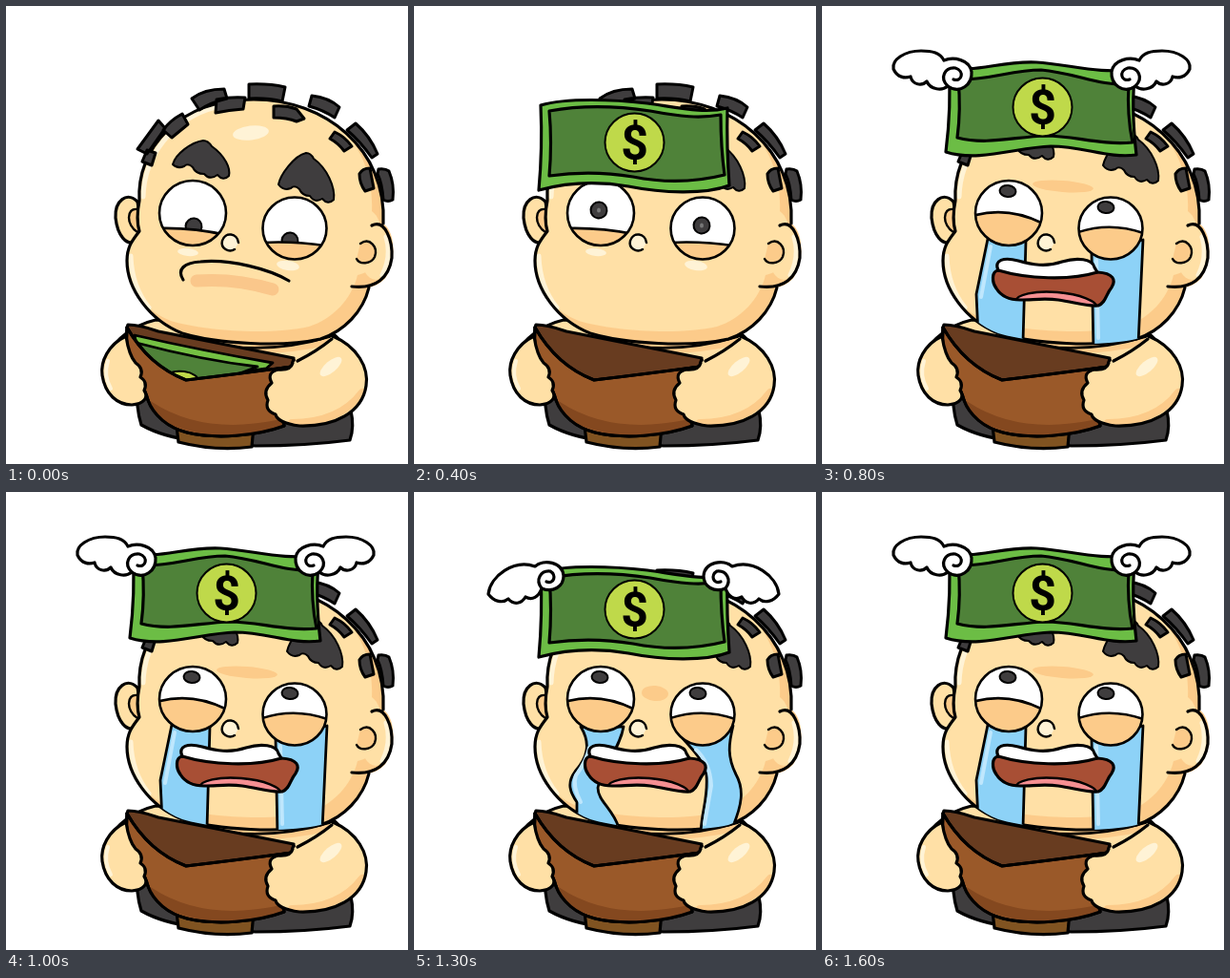
Write an HTML page with a canvas that moves like this. It is 422 px wide and 480 px high and loops after 1.7 s.

```html
<!DOCTYPE html>
<html>
<head>
<meta charset="utf-8">
<style>
html, body { margin: 0; width: 100%; height: 100%; overflow: hidden; background: #fff; }
canvas { display: block; }
</style>
</head>
<body>
<canvas id="stage" width="422" height="480"></canvas>
<script>
const ctx = document.getElementById('stage').getContext('2d');
const SKIN = '#ffe0a6', SHADE = '#fccb8a', LIGHT = '#fff3d6', HAIR = '#3f3d3e';
const LIME = '#6cbd45', GREEN = '#4f8239', COIN = '#bfd94a';
ctx.lineJoin = ctx.lineCap = 'round';

function shape(d, fill, width = 3.2) {
  const path = new Path2D(d);
  if (fill) { ctx.fillStyle = fill; ctx.fill(path); }
  if (width) { ctx.lineWidth = width; ctx.strokeStyle = '#000'; ctx.stroke(path); }
}
function oval(x, y, rx, ry, turn, fill, width = 0) {
  ctx.beginPath();
  ctx.ellipse(x, y, rx, ry, turn, 0, 7);
  ctx.fillStyle = fill;
  ctx.fill();
  if (width) { ctx.lineWidth = width; ctx.strokeStyle = '#000'; ctx.stroke(); }
}
function glow(d, color, width) {
  ctx.lineWidth = width;
  ctx.strokeStyle = color;
  ctx.stroke(new Path2D(d));
}
function moved(x, y, draw) {
  ctx.save();
  ctx.translate(x, y);
  draw();
  ctx.restore();
}
function clipped(d, draw) {
  ctx.save();
  ctx.clip(new Path2D(d));
  draw();
  ctx.restore();
}

const HEAD = 'M140 204C137 150 180 98 260 98C335 98 400 150 396 228C410 238 409 268 399 284C394 291 386 294 381 295C375 320 355 341 330 349C290 358 222 354 185 343C150 329 127 296 127 267C127 252 133 245 140 236C137 226 138 214 140 204Z';
const TUFTS = 'M160 120L167 128 148 155 138 150ZM195 97Q208 87 229 87L232 97Q215 101 203 109ZM255 82Q276 81 293 85L290 100Q274 96 255 97ZM321 94Q339 96 350 106L345 117Q333 109 318 105ZM367 123Q382 136 390 155L384 159Q372 142 358 130ZM391 171Q398 170 402 173Q408 187 406 203Q401 206 396 203Q395 186 390 176Z';
const INNER_TUFTS = 'M148 151L157 154 153 167 143 163ZM165 130Q172 120 185 113L191 124 174 138ZM221 98Q235 95 251 96L249 108Q234 109 220 112ZM281 105Q294 104 305 108L313 118 305 121Q295 117 281 117ZM345 132Q356 137 363 147L355 152Q349 144 340 139ZM371 176Q374 170 382 170L386 191 377 194Q371 186 371 176Z';
const BROW_L = 'M175 166C178 155 194 143 207 141Q212 141 216 147C230 157 236 170 234 178Q228 184 222 177Q214 183 208 176Q199 176 196 169Q191 164 187 168Q180 171 175 166Z';
const BROW_R = 'M286 187C288 177 302 157 315 154Q320 154 323 160C337 170 346 190 344 203Q338 209 332 202Q324 207 319 199Q311 199 308 192Q303 187 299 191Q291 194 286 187Z';
const MOUTH = 'M185 277C178 278 178 289 183 296C188 304 196 308 208 308C222 308 234 306 248 308C264 310 276 315 290 314C298 311 298 302 304 295C309 287 306 280 289 279Z';
const TEETH = 'M185 277C180 266 191 263 206 267C220 271 235 274 252 268C268 263 284 265 286 274L289 279C260 288 215 286 185 277Z';
const WALLET = 'M127 337C126 350 126 364 131 375C137 390 146 400 149 413C155 429 170 442 190 447C220 454 262 451 292 440L280 392Q299 388 302 371L300 378Q240 386 189 392Q150 377 127 337Z';
const ARM = 'M343 346C369 357 381 379 378 398C374 426 345 441 308 440C292 438 284 433 283 428Q271 424 275 413Q269 403 279 395Q273 384 286 381Q299 382 301 374';

// Pose-dependent faces: pupils, eyelids and eyebrows
const FACES = {
  down: { pupils: [197, 231, 298, 246], lids: 'M160 233Q198 232 235 241V256H160ZM268 248Q304 246 340 252V270H268Z', brow: [0, 0] },
  stare: { pupils: [194, 214, 302, 230], lids: 'M160 233Q198 232 235 240V256H160ZM268 248Q304 246 340 252V270H268Z', brow: [3, -12] },
  cry: { pupils: [195, 194, 298, 211], lids: 'M158 220Q196 209 234 229V256H158ZM266 238Q303 225 340 239V270H266Z', brow: [9, -20] }
};

function body() {
  shape('M138 398Q136 420 142 439Q165 452 200 456L262 461Q315 461 361 455Q366 441 362 424L300 390Z', HAIR);
  shape('M179 440L181 457Q220 467 258 462L260 440Z', '#805321');
  shape('M157 329C132 335 114 351 111 361L150 400H300L350 350 330 330Z', SKIN);
  glow('M185 348Q260 368 335 351', SHADE, 10);
  shape('M200 351Q270 368 342 346', null, 2.6);
}

function eyes(face, name) {
  const [lx, ly, rx, ry] = face.pupils, up = name === 'cry';
  [[196, 217, 35, 34], [303, 233, 33.5, 32.5]].forEach(([x, y, w, h], i) => {
    oval(x, y, w, h, 0, '#fff');
    ctx.save();
    ctx.beginPath();
    ctx.ellipse(x, y, w, h, 0, 0, 7);
    ctx.clip();
    const px = i ? rx : lx, py = i ? ry : ly;
    oval(px, py, 8.5, up ? 6 : 8.5, 0.1, HAIR, 2);
    if (name === 'stare') oval(px, py, 2, 2.5, 0, '#777');
    shape(face.lids, SHADE, 2.6);
    ctx.restore();
    ctx.beginPath();
    ctx.ellipse(x, y, w, h, 0, 0, 7);
    ctx.lineWidth = 2.6;
    ctx.strokeStyle = '#000';
    ctx.stroke();
  });
}

function tears(wavy) {
  clipped(HEAD, () => {
    shape(wavy
      ? 'M175 246C186 264 182 278 169 293C160 305 164 315 171 325L171 350 215 352C209 332 193 324 193 310C196 290 216 270 220 246ZM282 258C292 270 304 280 307 297C309 322 301 336 301 360L335 350C344 328 347 312 338 296C329 278 330 265 335 245Z'
      : 'M174 244L162 302 164 345 211 352 214 246ZM283 258L285 362 332 354 337 245Z', '#8dd2f7', 2.8);
    glow(wavy ? 'M184 268Q181 282 170 297Q166 308 175 325M296 270Q311 284 312 308L305 348' : 'M177 252L167 305M288 266L290 348', '#bfe7fd', 4);
  });
}

function head(name, wavy) {
  const face = FACES[name];
  shape('M138 205C127 194 114 204 115 222C117 240 126 252 137 247L142 230Z', SKIN);
  shape('M138 213C126 211 126 230 138 237', SHADE, 2.4);
  shape(HEAD, SHADE, 0);
  clipped(HEAD, () => {
    moved(-12, -13, () => shape(HEAD, SKIN, 0));
    oval(388, 259, 16, 28, 0, SKIN);
    glow('M144 200C145 158 174 118 220 106M131 262Q132 294 150 316M399 242Q405 262 395 282', LIGHT, 5);
  });
  // Outline with the open ear seam on the right
  shape('M140 204C137 150 180 98 260 98C335 98 400 150 396 228M140 204C138 214 137 226 140 236C133 245 127 252 127 267C127 296 150 329 185 343C222 354 290 358 330 349C355 341 375 320 381 295M384 230C398 223 406 246 405 264C402 285 388 297 363 294', null);
  shape('M372 249C382 242 391 253 387 263C383 271 371 271 368 265', SHADE, 2.4);
  shape(TUFTS + INNER_TUFTS, HAIR, 3);
  oval(257, 133, 19, 7.5, -0.12, LIGHT);
  if (name === 'cry') {
    oval(253, wavy ? 211 : 189, wavy ? 14 : 32, wavy ? 8 : 6, 0.08, SHADE);
    tears(wavy);
  } else {
    oval(191, 258, 11, 4, 0.1, LIGHT);
    oval(296, 272, 12, 5, 0.15, LIGHT);
  }
  moved(...face.brow, () => shape(BROW_L + BROW_R, HAIR, 2));
  eyes(face, name);
  shape('M244 248C243 238 230 236 227 246C225 254 234 259 240 255', LIGHT, 2.5);
  if (name === 'cry') {
    shape(MOUTH, '#a84f35', 0);
    clipped(MOUTH, () => oval(246, 313, 43, 13, 0.08, '#f58f92', 2.4));
    shape(MOUTH, null);
    shape(TEETH, '#fff');
  } else if (name === 'down') {
    glow('M200 288Q240 285 280 297', '#fac78b', 13);
    shape('M186 287C179 276 187 269 204 268C236 265 277 276 297 288', null);
  }
}

function arms() {
  shape('M126 346C107 355 99 373 101 387C104 407 117 418 132 418C145 417 150 410 145 403Q149 394 141 389Q145 380 136 374Q129 366 126 346Z', SKIN);
  glow('M107 372Q102 387 110 401', LIGHT, 4);
  shape(ARM + 'L330 356Z', SKIN, 0);
  clipped(ARM, () => glow('M374 405Q350 437 300 437', SHADE, 8));
  shape(ARM + 'M306 372Q326 362 342 349', null);
  oval(341, 378, 14, 6, -0.7, LIGHT);
}

function walletBack() {
  shape('M128 334Q140 334 160 341L302 369 300 378Q240 387 189 392Q150 380 127 337Z', '#683c20');
}
function walletFront() {
  shape(WALLET, '#9a5929');
  clipped(WALLET, () => glow('M150 420Q205 456 285 440', '#84481f', 12));
  shape(WALLET, null);
}
function tuckedBill() {
  shape('M135 345Q205 361 280 374L273 380 189 392Q155 380 136 350Z', '#74c043', 2.8);
  shape('M137 353Q205 371 264 378L240 387 189 392Q157 380 137 353Z', GREEN, 2.8);
  oval(186, 390, 16, 7, 0.15, COIN, 2);
}

function smallBill() {
  shape('M163 246C185 262 216 255 245 266C268 278 287 285 306 288C300 309 285 330 286 351C260 349 240 336 215 333C188 329 163 322 149 317C160 298 165 272 163 246Z', LIME);
  shape('M186 261C215 270 245 278 281 290Q269 314 266 335C234 321 208 311 178 306Q188 284 186 261Z', GREEN);
  oval(231, 292, 18, 14, 0.25, COIN, 2.6);
}

function bigBill(high) {
  if (high) {
    shape('M133 60C155 74 183 57 225 59C260 61 290 72 329 66Q324 105 330 156C300 160 275 147 240 147C205 148 165 164 130 153Q136 105 133 60Z', LIME);
    shape('M143 77C175 78 199 67 230 67C265 70 292 84 322 82Q320 114 326 143C292 146 265 136 235 136C202 137 173 146 142 138Q146 108 143 77Z', GREEN);
  } else {
    shape('M133 84C160 76 210 78 245 82C280 87 305 93 329 87Q328 128 331 168C305 178 260 176 225 169C190 163 157 166 131 173Q135 130 133 84Z', LIME);
    shape('M142 90C180 83 215 85 248 90C280 96 300 98 322 94Q322 128 326 157C290 166 260 165 230 159C200 154 170 154 142 158Q145 123 142 90Z', GREEN);
  }
  const y = high ? 106 : 123;
  oval(231.5, y, 31, 30.5, 0, COIN, 2);
  ctx.fillStyle = '#000';
  ctx.font = 'bold 50px Roboto, sans-serif';
  ctx.textAlign = 'center';
  ctx.textBaseline = 'alphabetic';
  ctx.fillText('$', 231.5, y + 17.5);
}

function wings(high) {
  const wing = () => {
    if (high) {
      shape('M157 69C155 56 138 53 128 57C124 49 116 47 104 47C87 47 73 56 75 66C79 75 87 76 93 74C95 83 105 84 110 79C114 88 126 89 132 84C145 93 158 82 157 69Z', '#fff');
      shape('M132 84C123 75 129 64 140 65C150 68 147 80 138 77', null);
    } else {
      shape('M157 88C156 73 136 70 127 78C105 70 80 88 78 107C84 115 93 117 99 112C105 119 113 117 117 110C124 114 131 110 134 101C146 106 157 99 157 88Z', '#fff');
      shape('M134 101C127 92 133 82 143 83C150 87 147 97 139 94', null);
    }
  };
  wing();
  ctx.save();
  ctx.translate(461, 0);
  ctx.scale(-1, 1);
  wing();
  ctx.restore();
}

function scene(step) {
  const crying = step >= 5, high = step % 2 === 0;
  ctx.fillStyle = '#fff';
  ctx.fillRect(0, 0, 422, 480);
  body();
  head(crying ? 'cry' : step ? 'stare' : 'down', !high);
  walletBack();
  if (step === 0) tuckedBill();
  if (step === 1) moved(-16, 52, smallBill);
  walletFront();
  arms();
  if (step === 2) smallBill();
  if (step === 3) moved(0, -70, smallBill);
  if (step === 4) moved(0, 20, () => bigBill(false));
  if (crying) {
    moved(0, step === 14 ? -17 : 0, () => {
      bigBill(high);
      wings(high);
    });
  }
}

let shown = -1;
function tick() {
  const step = Math.floor(performance.now() % 1700 / 100);
  if (step !== shown) scene(shown = step);
  requestAnimationFrame(tick);
}
tick();
</script>
</body>
</html>
```
